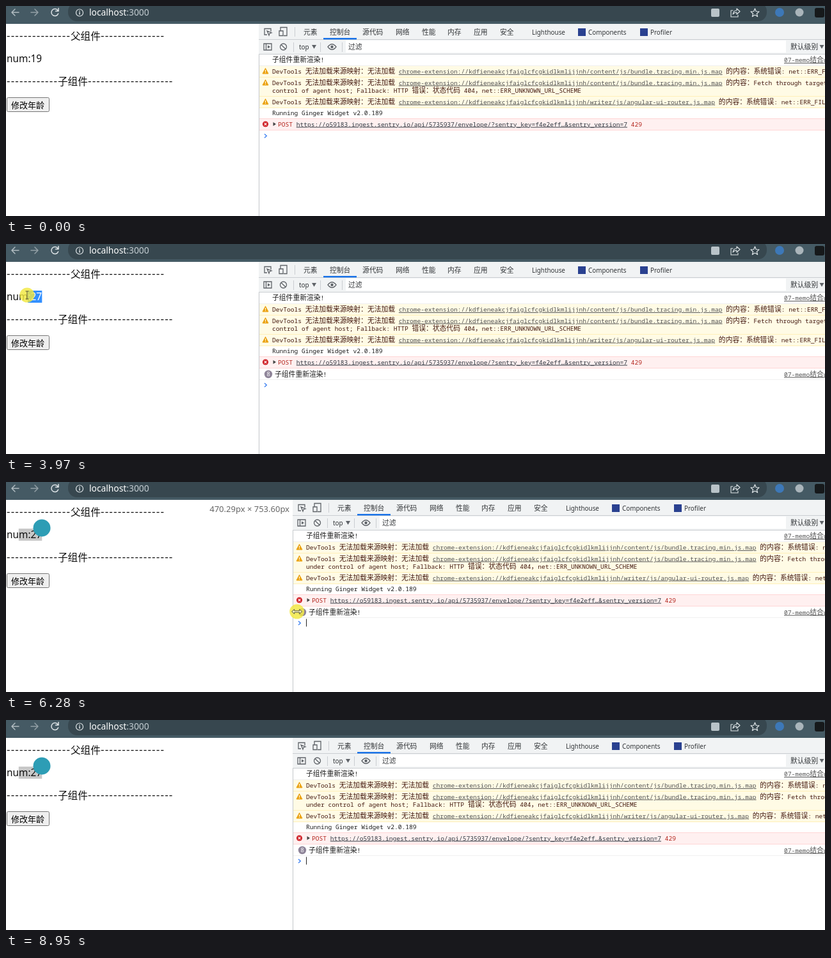
Write an HTML page that moves like this. It is 1280 by 329 pixels and loops after 9020 ms.

```html
<!DOCTYPE html>
<html lang="zh-CN">
<head>
<meta charset="utf-8">
<title>memo 演示</title>
<style>
html, body { margin: 0; width: 100%; height: 100%; overflow: hidden; background: #fff; }
svg { display: block; width: 1280px; height: 329px; }
text { white-space: pre; font-family: "Noto Sans", "Noto Sans CJK SC", "Noto Sans CJK", sans-serif; }
.mono { font: 9.58px "Noto Sans Mono", "Liberation Mono", "Noto Sans CJK SC", monospace; fill: #1c1c1c; }
.cjk { font-family: "Noto Sans CJK SC", "Noto Sans CJK", sans-serif; font-size: 10.8px; }
.link { text-decoration: underline; fill: #545454; }
.warn { fill: #43180f; }
.err { fill: #b3261e; }
.err .link { fill: #303942; }
.tab { font-size: 9.9px; fill: #333639; }
.page { font-size: 15.4px; fill: #111; }
.page .cjk { font-size: 15.6px; }
.dash { font-size: 17px; letter-spacing: 1.2px; fill: #111; }
.icon { fill: none; stroke: #5f6368; stroke-width: 1.3; }
.bar { fill: none; stroke: #dfe5e8; stroke-width: 1.5; stroke-linecap: round; stroke-linejoin: round; }
</style>
</head>
<body>
<svg id="stage" viewBox="0 0 1280 329"></svg>
<script>
const LOOP = 9020;
const MESSAGE = '子组件重新渲染!';
const CLICKS = [900, 1370, 1700, 2030, 2300, 2640, 2910, 3200];

// [time, x, y, pointer shape]
const POINTER = [
  [70, 150, 335, 'arrow'], [300, 100, 210, 'arrow'], [500, 66, 160, 'arrow'], [680, 48, 149, 'arrow'],
  [3230, 48, 149, 'arrow'], [3450, 58, 105, 'arrow'], [3560, 58, 84, 'beam'], [3690, 56, 80, 'beam'],
  [3830, 50, 80, 'beam'], [3970, 33, 80, 'beam'], [4100, 26, 80, 'beam'], [4300, 26, 80, 'beam'],
  [4480, 70, 78, 'arrow'], [4750, 270, 148, 'arrow'], [4920, 370, 205, 'arrow'], [5140, 408, 214, 'arrow'],
  [5210, 408, 212, 'arrow'], [5420, 401, 203, 'resize'], [5620, 401, 203, 'resize'],
  [5890, 451, 203, 'resize'], [6100, 454, 203, 'resize'], [6360, 455, 203, 'arrow'], [6490, 478, 201, 'arrow'],
  [6700, 538, 204, 'arrow'], [6980, 481, 205, 'arrow'], [7460, 478, 206, 'arrow'],
  [7530, 479, 208, 'arrow'], [7760, 496, 246, 'arrow'], [8090, 520, 335, 'arrow']
];
const SHIFT = [[5660, 0], [5760, 9], [5890, 31], [5960, 43], [6100, 50], [6300, 53]];
const SELECT_FROM = [[3830, 47.2], [3900, 38.3], [3970, 34.1], [4100, 19.8]];

const mix = s => s
  .replace(/[\u3000-\uffef]+/g, m => `<tspan class="cjk">${m}</tspan>`)
  .replace(/\[(.+?)\]/g, '<tspan class="link">$1</tspan>');
const text = (x, y, s, cls, more = '') => `<text x="${x}" y="${y}" class="${cls}" ${more}>${mix(s)}</text>`;
const rect = (x, y, w, h, fill, more = '') => `<rect x="${x}" y="${y}" width="${w}" height="${h}" fill="${fill}" ${more}/>`;
const path = (d, cls, more = '') => `<path d="${d}" class="${cls}" ${more}/>`;
const disc = (x, y, r, fill, more = '') => `<circle cx="${x}" cy="${y}" r="${r}" fill="${fill}" ${more}/>`;
const row = (y, h, fill, line) => rect(396, y, 900, h, fill) + rect(396, y + h - 1, 900, 1, line);
const down = (x, y) => path(`M${x} ${y}h7l-3.5 6z`, '', 'fill="#5f6368"');
const rule = (x, y) => rect(x, y, 1, 15, '#cacdd1');

function browserBar() {
  return rect(0, 0, 1280, 28, '#455a64')
    + rect(97, -6, 1092, 30, '#37474f', 'rx="14"')
    + path('M20 10H9M14 5L9 10L14 15', 'bar', 'opacity=".7"')
    + path('M39 10H50M45 5L50 10L45 15', 'bar', 'opacity=".5"')
    + path('M81 7A5.5 5.5 0 1 0 81.6 12M82 3.5V8H77.5', 'bar')
    + '<circle cx="115" cy="10.500" r="5.500" class="bar" style="stroke-width:1.2"/>'
    + path('M115 10V13M115 7.800V7.900', 'bar')
    + '<text x="130" y="15.300" font-size="13.800" fill="#fff">localhost<tspan fill="#c3ccd1">:3000</tspan></text>'
    + rect(1102, 4, 13, 13, '#b9c3c8', 'rx="2"')
    + path('M1136 7H1133V17H1144V14M1136 13Q1137 7 1142 7V4L1147 8.500L1142 13V10Q1138 10 1136 13Z', 'bar', 'style="stroke-width:1.1"')
    + path('M1170.500 4L1172.300 8.500L1177 8.900L1173.400 12L1174.600 16.600L1170.500 14L1166.400 16.600L1167.600 12L1164 8.900L1168.700 8.500Z', 'bar', 'style="stroke-width:1.2"')
    + disc(1209, 10, 7, '#3d78b8')
    + disc(1240, 10, 6.5, '#aab5bb')
    + rect(1264, 3, 15, 15, '#16191b', 'rx="3"');
}

function leftPage() {
  const dashes = (x, y, n) => text(x, y, '-'.repeat(n), 'dash');
  const num = (id, fill, more) => `<text id="${id}" x="1" y="88" class="page" style="fill:${fill}" ${more}></text>`;
  return dashes(1, 52.2, 15) + text(101, 52.7, '父组件', 'page') + dashes(148, 52.2, 15)
    + num('num', '#111', '')
    + '<g id="picked"><rect id="pickBox" y="73" height="19"/>'
    + '<clipPath id="pickClip"><rect id="pickCut" y="73" height="19"/></clipPath>'
    + num('numPicked', '#fff', 'clip-path="url(#pickClip)"') + '</g>'
    + dashes(1, 123.2, 12) + text(81, 123.7, '子组件', 'page') + dashes(128, 123.2, 20)
    + rect(1.5, 143.5, 66, 22, '#efefef', 'id="button" rx="2" stroke="#767676"')
    + '<text x="8" y="159.500" font-size="13" fill="#000">修改年龄</text>'
    + disc(56, 72, 13.5, '#2d9db5', 'id="bubble"');
}

function toolbars() {
  const tabs = [[465, '元素'], [506, '控制台'], [557, '源代码'], [609, '网络'], [650, '性能'], [690, '内存'],
    [731, '应用'], [772, '安全'], [822, 'Lighthouse'], [910, 'Components'], [1007, 'Profiler']];
  return rect(395, 28, 950, 48, '#f1f3f4')
    + rect(395, 52, 950, 1, '#cacdd1') + rect(395, 75, 950, 1, '#cacdd1')
    + path('M408 45H404V35.500H414V40M408 39L415 42L412 43L411 46Z', 'icon')
    + path('M429 39V33.500H439V46.500H434M427 39H433V46.500H427Z', 'icon')
    + rule(451, 33)
    + tabs.map(([x, s]) => text(x, 45, s, 'tab')).join('')
    + rect(496, 50, 52, 2.5, '#1a73e8')
    + rect(894, 35, 12, 12, '#2a4190') + rect(991, 35, 12, 12, '#2a4190')
    + path('M403 59H415V69H403ZM406.500 59V69', 'icon') + path('M409 61.500L413 64L409 66.500Z', '', 'fill="#5f6368"')
    + path('M438.500 64A5 5 0 1 1 428.500 64A5 5 0 1 1 438.500 64M430 60.500L437 67.500', 'icon')
    + rule(449, 57) + text(458, 67.500, 'top', 'tab') + down(478, 61) + rule(491, 57)
    + path('M503 64Q509.500 55.500 516 64Q509.500 72.500 503 64Z', 'icon') + disc(509.5, 64, 2.2, '#5f6368')
    + rule(525, 57)
    + rect(531, 54, 800, 19, '#fff') + text(535, 67.800, '过滤', 'tab');
}

function consoleRows() {
  const base = 'chrome-extension://kdfieneakcjfaiglcfcgkidlkmlijjnh/';
  const bundle = base + 'content/js/bundle.tracing.min.js.map';
  const lead = 'DevTools 无法加载来源映射：无法加载 ';
  const warn = y => path(`M405.500 ${y - 4.5}L410 ${y + 4}H401Z`, '', 'fill="#eba313" stroke="#eba313" stroke-linejoin="round"')
    + rect(405, y - 2, 1, 3.2, '#fff') + rect(405, y + 2, 1, 1, '#fff');
  const pale = '#fffbe5', edge = '#fff0b8';
  return rect(396, 76, 900, 260, '#fff')
    + rect(396, 93, 900, 1, '#f0f0f0') + text(416, 88, MESSAGE, 'mono')
    + row(94, 18, pale, edge) + row(112, 30, pale, edge) + row(142, 18, pale, edge)
    + [102, 120, 150].map(warn).join('')
    + text(416, 106, `${lead}[${bundle}] 的内容：系统错误: net::ERR_FILE_NOT_FOUND`, 'mono warn')
    + text(416, 123.5, `${lead}[${bundle}] 的内容：Fetch through target`, 'mono warn')
    + text(416, 136, 'control of agent host; Fallback: HTTP 错误：状态代码 404，net::ERR_UNKNOWN_URL_SCHEME', 'mono warn', 'id="wrapped"')
    + text(416, 153.5, `${lead}[${base}writer/js/angular-ui-router.js.map] 的内容：系统错误: net::ERR_FILE_NOT_FOUND`, 'mono warn')
    + text(416, 171, 'Running Ginger Widget v2.0.189', 'mono')
    + row(176, 19, '#fff0f0', '#ffd6d6') + rect(396, 176, 900, 1, '#ffd6d6')
    + disc(405.5, 185, 4.6, '#d0252b') + path('M403.700 183.200l3.600 3.600m0-3.600l-3.600 3.600', '', 'stroke="#fff" stroke-width="1.1"')
    + path('M417.500 182L422 185L417.500 188Z', '', 'fill="#444"')
    + text(425, 188.5, 'POST [https://o59183.ingest.sentry.io/api/5735937/envelope/?sentry_key=f4e2eff…&amp;sentry_version=7] 429', 'mono err')
    + '<g id="added">' + rect(396, 195, 900, 17, '#ecf1f8', 'id="hover"') + rect(396, 212, 900, 1, '#f0f0f0')
    + rect(0, 197, 0, 14, '#add6fb', 'id="marked"')
    + '<g id="badge">' + disc(410, 204, 6.2, '#8f8599')
    + '<text id="count" x="410" y="207.300" font-size="9" fill="#fff" text-anchor="middle"></text></g>'
    + text(416, 207.500, MESSAGE, 'mono', 'id="again"') + '</g>'
    + '<g id="prompt">' + path('M404 200.500L407.300 203.500L404 206.500', '', 'fill="none" stroke="#367cf1" stroke-width="1.300"')
    + rect(416, 197, 1, 12, '#222', 'id="caret"') + '</g>'
    + rect(395, 28, 1, 301, '#c4c7cb');
}

function rightEdge() {
  const file = '[07-memo结合useCallback.jsx:9]';
  return rect(1219, 53, 61, 22, '#f1f3f4')
    + text(1226, 67.800, '默认级别', 'tab') + down(1271.5, 61)
    + text(1216, 88, file, 'mono') + text(1216, 207.500, file, 'mono', 'id="file"');
}

const pointers = '<g id="pointer"><circle r="11.500" fill="#f2e840" fill-opacity=".82"/>'
  + '<path id="arrow" d="M0 0V12L2.800 9.500L4.800 14L6.800 13.100L4.900 8.800H8.800Z" fill="#fff" stroke="#111" stroke-width=".9"/>'
  + '<path id="beam" d="M-2.500 -6H2.500M0 -6V6M-2.500 6H2.500" fill="none" stroke="#333" stroke-width=".8"/>'
  + '<path id="resize" d="M-8 0L-4 -3.500V-1.200H4V-3.500L8 0L4 3.500V1.200H-4V3.500Z" fill="#fff" fill-opacity=".6" stroke="#333" stroke-width=".8"/></g>';

document.getElementById('stage').innerHTML = leftPage()
  + '<g id="size"><rect id="sizeBox" y="30" width="130" height="22" fill="#fff" fill-opacity=".8"/>'
  + '<text id="sizeText" y="46.500" font-size="13" fill="#666" text-anchor="end"></text></g>'
  + `<g id="panel">${consoleRows()}${toolbars()}</g>` + rightEdge() + browserBar() + pointers;

const el = id => document.getElementById(id);
const show = (id, on) => { el(id).style.display = on ? '' : 'none'; };
const set = (id, attrs) => { for (const k in attrs) el(id).setAttribute(k, attrs[k]); };
const within = (t, a, b) => t >= a && t < b;

function at(table, t, col = 1) {
  const i = table.findIndex(k => k[0] > t);
  if (i === 0) return table[0][col];
  if (i < 0) return table[table.length - 1][col];
  const a = table[i - 1], b = table[i];
  return a[col] + (b[col] - a[col]) * (t - a[0]) / (b[0] - a[0]);
}
const held = (table, t, col) => table.reduce((v, k) => k[0] <= t ? k[col] : v, table[0][col]);

function draw(t) {
  const clicks = CLICKS.filter(c => c <= t).length;
  const dx = Math.round(at(SHIFT, t));
  const x = at(POINTER, t, 1), y = at(POINTER, t, 2), kind = held(POINTER, t, 3);

  el('num').textContent = el('numPicked').textContent = 'num:' + (19 + clicks);
  show('picked', t >= 3830);
  const from = held(SELECT_FROM, t, 1), cut = { x: from, width: 56.3 - from };
  set('pickBox', { ...cut, fill: t < 5620 ? '#3390ff' : '#c8c8c8' });
  set('pickCut', cut);
  el('numPicked').style.fill = t < 5620 ? '#fff' : '#111';
  show('bubble', t >= 4370);
  set('button', { fill: CLICKS.some(c => within(t, c - 75, c)) ? '#f5f5f5' : '#efefef' });

  set('panel', { transform: `translate(${dx} 0)` });
  const wide = dx > 40 ? 'under control' : 'control';
  const line = el('wrapped').firstChild;
  line.data = line.data.replace(/^(under )?control/, wide);
  show('size', within(t, 5680, 6900));
  set('sizeBox', { x: 263 + dx });
  set('sizeText', { x: 390 + dx });
  el('sizeText').textContent = (447.2 * (395 + dx) / 426).toFixed(2) + 'px × 753.60px';

  const hover = t > 6400 && within(y, 195, 213);
  show('added', clicks > 0);
  show('file', clicks > 0);
  show('hover', hover);
  el('file').firstChild.style.fill = hover ? '#111' : '';
  show('badge', clicks > 1);
  el('count').textContent = clicks;
  set('again', { x: clicks > 1 ? 420 : 416 });
  const start = 420 + Math.max(0, Math.min(5, Math.round((x - 473) / 10.8))) * 10.8;
  show('marked', within(t, 6720, 7700));
  set('marked', { x: start, width: Math.max(0, 484.8 - start) });

  set('prompt', { transform: `translate(0 ${clicks ? 17.5 : 0})` });
  show('caret', within(t, 5690, 6290) || within(t, 7760, 8350) || t >= 8950);

  show('pointer', within(t, 70, 8090));
  set('pointer', { transform: `translate(${x} ${y})` });
  for (const k of ['arrow', 'beam', 'resize']) show(k, k === kind);
}

const began = performance.now();
function tick() {
  draw((performance.now() - began) % LOOP);
  requestAnimationFrame(tick);
}
tick();
</script>
</body>
</html>
```
